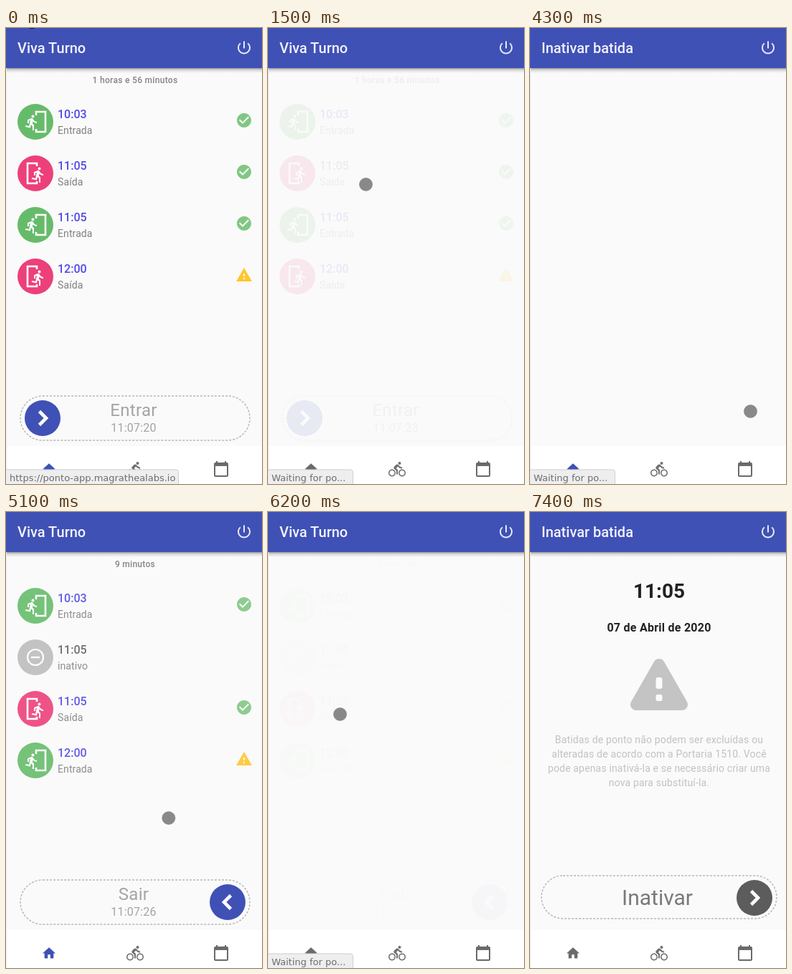
Animation, 357 px wide and 637 px high, one loop 8 s. Source, as an HTML page:

```html
<!DOCTYPE html>
<html lang="pt-BR">
<head>
<meta charset="utf-8">
<title>Viva Turno</title>
<style>
  html, body { margin: 0; width: 100%; height: 100%; overflow: hidden; background: #fafafa; }
  svg { display: block; width: 100vw; height: 100vh; font-family: Roboto, sans-serif; filter: blur(.45px); }
  .mid { text-anchor: middle; }
  .time { font-size: 16px; font-weight: 500; fill: #5149ea; }
  .kind { font-size: 14px; fill: #808080; letter-spacing: .1px; }
  .total { font-size: 12px; font-weight: 500; fill: #858585; letter-spacing: .3px; }
  .action { font-size: 24px; fill: #a4a4a4; letter-spacing: .3px; }
  .clock { font-size: 16px; fill: #a4a4a4; letter-spacing: .25px; }
  .note { font-size: 14px; fill: #c2c2c2; letter-spacing: .16px; }
  .track { fill: none; stroke: #b8b8b8; stroke-width: 1.5; stroke-dasharray: 3 2; }
  .line { fill: none; stroke: #fff; }
</style>
</head>
<body>
<svg id="stage" viewBox="0 0 357 637">
  <defs>
    <linearGradient id="shade" x2="0" y2="1">
      <stop offset="0" stop-color="#000" stop-opacity=".38"/>
      <stop offset=".4" stop-color="#000" stop-opacity=".13"/>
      <stop offset="1" stop-color="#000" stop-opacity="0"/>
    </linearGradient>
  </defs>
  <rect width="357" height="637" fill="#fafafa"/>
  <g id="before"></g>
  <g id="after"></g>
  <g id="detail"></g>
  <rect y="56" width="357" height="7" fill="url(#shade)"/>
  <rect width="357" height="56" fill="#3f51b5"/>
  <text id="title" x="16" y="35" font-size="20" font-weight="500" fill="#f2f3fb"></text>
  <g id="power"></g>
  <rect y="584" width="357" height="53" fill="#fff"/>
  <g id="nav"></g>
  <rect y="56" width="1" height="581" fill="#ececec"/>
  <g id="status">
    <path id="tag" fill="#eee" stroke="#cfcfcf"/>
    <text id="tagText" x="5" y="632.5" font-size="13" fill="#6c6c6c" font-family="DejaVu Sans, sans-serif"></text>
  </g>
  <circle id="touch" r="9.3"/>
</svg>
<script>
const LOOP = 8000, STEP = 100;
const $ = id => document.getElementById(id);

const ICON = {
  home: 'M10 20v-6h4v6h5v-8h3L12 3 2 12h3v8z',
  bike: 'M15.5 5.5c1.1 0 2-.9 2-2s-.9-2-2-2-2 .9-2 2 .9 2 2 2zM5 12c-2.8 0-5 2.2-5 5s2.2 5 5 5 5-2.2 5-5-2.2-5-5-5zm0 8.5c-1.9 0-3.5-1.6-3.5-3.5s1.6-3.5 3.5-3.5 3.5 1.6 3.5 3.5-1.6 3.5-3.5 3.5zm5.8-10l2.4-2.4.8.8c1.3 1.3 3 2.1 5.1 2.1V9c-1.5 0-2.7-.6-3.6-1.5l-1.9-1.9c-.5-.4-1-.6-1.6-.6s-1.1.2-1.4.6L7.8 8.4c-.4.4-.6.9-.6 1.4 0 .6.2 1.1.6 1.4L11 14v5h2v-6.2l-2.2-2.3zM19 12c-2.8 0-5 2.2-5 5s2.2 5 5 5 5-2.2 5-5-2.2-5-5-5zm0 8.5c-1.9 0-3.5-1.6-3.5-3.5s1.6-3.5 3.5-3.5 3.5 1.6 3.5 3.5-1.6 3.5-3.5 3.5z',
  calendar: 'M20 3h-1V1h-2v2H7V1H5v2H4c-1.1 0-2 .9-2 2v16c0 1.1.9 2 2 2h16c1.1 0 2-.9 2-2V5c0-1.1-.9-2-2-2zm0 18H4V8h16v13z',
  power: 'M13 3h-2v10h2V3zm4.83 2.17l-1.42 1.42C17.99 7.86 19 9.81 19 12c0 3.87-3.13 7-7 7s-7-3.13-7-7c0-2.19 1.01-4.14 2.58-5.42L6.17 5.17C4.23 6.82 3 9.26 3 12c0 4.97 4.03 9 9 9s9-4.03 9-9c0-2.74-1.23-5.18-3.17-6.83z',
  check: 'M12 2C6.48 2 2 6.48 2 12s4.48 10 10 10 10-4.48 10-10S17.52 2 12 2zm-2 15l-5-5 1.41-1.41L10 14.17l7.59-7.59L19 8l-9 9z',
  warn: 'M1 21h22L12 2 1 21zm12-3h-2v-2h2v2zm0-4h-2v-4h2v4z',
  run: 'M13.49 5.48c1.1 0 2-.9 2-2s-.9-2-2-2-2 .9-2 2 .9 2 2 2zm-3.6 13.9l1-4.4 2.1 2v6h2v-7.5l-2.1-2 .6-3c1.3 1.5 3.3 2.5 5.5 2.5v-2c-1.9 0-3.5-1-4.3-2.4l-1-1.6c-.4-.6-1-1-1.7-1-.3 0-.5.1-.8.1l-5.2 2.2v4.7h2v-3.4l1.8-.7-1.6 8.1-4.9-1-.4 2 7 1.4z'
};

const icon = (name, x, y, fill, extra = '', scale = 1) =>
  `<path d="${ICON[name]}" transform="translate(${x} ${y}) scale(${scale})" fill="${fill}" ${extra}/>`;
const text = (cls, x, y, s, extra = '') => `<text class="${cls}" x="${x}" y="${y}" ${extra}>${s}</text>`;
const track = (x, y, w, h) =>
  `<rect class="track" x="${x}" y="${y}" width="${w}" height="${h}" rx="${h / 2}"/>`;
const knob = (x, y, dir, extra = '') =>
  `<g transform="translate(${x} ${y})" ${extra}><circle r="25" fill="#3f51b5"/>
   <path class="line" stroke-width="4.6" d="M${-4.5 * dir} -9.5L${5 * dir} 0L${-4.5 * dir} 9.5"/></g>`;

const BADGE = {
  Entrada: ['#66bb6a', '<path class="line" stroke-width="2.6" d="M1 -9V-14H14V14H1V10"/>' + icon('run', -17, -11, '#fff')],
  'Saída': ['#ec407a', '<path class="line" stroke-width="2.6" d="M2 -10V-14H-11V14H2V11"/>' + icon('run', -8, -10, '#fff')],
  inativo: ['#bdbdbd', '<circle class="line" r="11" stroke-width="2.2"/><path class="line" stroke-width="2.4" d="M-6 0H6"/>']
};

function row(i, time, kind, mark) {
  const y = 131 + 72 * i, [color, art] = BADGE[kind];
  const marks = {
    check: icon('check', 320, y - 14, '#81c784'),
    warn: icon('warn', 320, y - 14, '#ffc62e')
  };
  return `<g transform="translate(41 ${y})"><circle r="25" fill="${color}"/>${art}</g>` +
    text('time', 72, y - 5, time, kind === 'inativo' ? 'style="fill:#606060"' : '') +
    text('kind', 72, y + 17, kind) + (marks[mark] || '');
}

function home(total, rows, action, knobX, dir) {
  return text('total mid', 180, 77, total) +
    `<g class="rows">${rows.map((r, i) => row(i, ...r)).join('')}</g>` +
    track(20, 514, 320, 62) +
    text('action mid', 178, 542, action) + text('clock mid', 178, 564, '') +
    knob(knobX, 545, dir);
}

$('before').innerHTML = home('1 horas e 56 minutos', [
  ['10:03', 'Entrada', 'check'], ['11:05', 'Saída', 'check'],
  ['11:05', 'Entrada', 'check'], ['12:00', 'Saída', 'warn']], 'Entrar', 51, 1);
$('after').innerHTML = home('9 minutos', [
  ['10:03', 'Entrada', 'check'], ['11:05', 'inativo'],
  ['11:05', 'Saída', 'check'], ['12:00', 'Entrada', 'warn']], 'Sair', 309, -1);

$('detail').innerHTML =
  text('mid', 180, 120, '11:05', 'font-size="28" font-weight="700" fill="#222"') +
  text('mid', 180, 167, '07 de Abril de 2020', 'font-size="16" font-weight="700" fill="#222" letter-spacing=".25"') +
  `<path d="M180 213L148 269H212Z" fill="#c4c4c4" stroke="#c4c4c4" stroke-width="16" stroke-linejoin="round"/>
   <rect x="175.5" y="231" width="9" height="16" rx="3" fill="#fafafa"/>
   <rect x="175.5" y="255" width="9" height="9" rx="2" fill="#fafafa"/>` +
  ['Batidas de ponto não podem ser excluídas ou', 'alteradas de acordo com a Portaria 1510. Você',
   'pode apenas inativá-la e se necessário criar uma', 'nova para substituí-la.']
    .map((s, i) => text('note mid', 180, 323 + 20 * i, s)).join('') +
  track(16, 508, 328, 60) +
  text('mid', 177.5, 549, 'Inativar', 'font-size="30" fill="#7a7a7a"') +
  knob(47, 539, 1, 'id="slider"');

$('power').innerHTML = icon('power', 320, 15.5, '#e8eaf7');
$('nav').innerHTML = icon('home', 49.2, 605.6, '', 'id="homeIcon"', .9) +
  icon('bike', 168, 604.5, '#707070') + icon('calendar', 288, 604, '#6a6a6a');

// Linear interpolation over [time, ...values] keys.
function mix(keys, t) {
  let a = keys[0];
  for (const b of keys) {
    if (b[0] > t) {
      const k = t <= a[0] ? 0 : (t - a[0]) / (b[0] - a[0]);
      return a.slice(1).map((v, i) => v + (b[i + 1] - v) * k);
    }
    a = b;
  }
  return a.slice(1);
}

const fadeOut = t => [[t, 1], [t + 100, .75], [t + 200, .35], [t + 300, .1], [t + 400, .02], [t + 500, 0]];
const fade = {
  before: [[0, 1], ...fadeOut(1200)],
  after: [[0, 0], [4799, 0], [4800, 1], ...fadeOut(5800)],
  detail: [[0, 0], [2100, 0], [2400, 1], [4299, 1], [4300, 0], [6600, 0], [6900, 1]]
};
const slide = [[0, 47], [3000, 47], [3400, 313], [4300, 313], [4301, 47], [7000, 47], [7400, 313]];
const path = [[0, 36, -8.5], [700, 136.5, 218.5], [1900, 136.5, 218.5], [2400, 92, 388], [2900, 92, 388],
  [3000, 48, 540], [3400, 307.5, 535.5], [4400, 307.5, 535.5], [4500, 290, 500], [4900, 290, 500],
  [5500, 100.5, 282.5], [6600, 100.5, 282.5], [7000, 48, 540], [7400, 307.5, 535.5]];

const within = (t, ...spans) => spans.some(([a, b]) => t >= a && t < b);
const set = (el, attrs) => { for (const k in attrs) el.setAttribute(k, attrs[k]); };

function setStatus(t) {
  const link = t < 1400, wait = within(t, [1400, 2000], [4300, 4800], [6000, 6600]);
  set($('status'), { visibility: link || wait ? 'visible' : 'hidden' });
  const right = link ? 241 : 119;
  set($('tag'), { d: `M-2 617H${right - 4}q3.5 0 3.5 3.5V640H-2Z` });
  $('tagText').textContent = link ? 'https://ponto-app.magrathealabs.io' : 'Waiting for po...';
}

function draw(t) {
  for (const id in fade) {
    const [o] = mix(fade[id], t);
    set($(id), { opacity: o, visibility: o ? 'visible' : 'hidden' });
  }
  $('before').querySelectorAll('.time')[1].style.fill = t >= 1300 ? '#777' : '';
  set($('after').querySelector('.rows'), { opacity: mix([[4800, .6], [5200, 1]], t)[0] });

  const sec = t < 300 ? 20 : t < 700 ? 21 : t < 1300 ? 22 : t < 4000 ? 23 : t < 5000 ? 25 : t < 5400 ? 26 : 27;
  document.querySelectorAll('.clock').forEach(c => c.textContent = '11:07:' + sec);

  const [x] = mix(slide, t), done = x >= 313;
  set($('slider'), { transform: `translate(${x} 539)` });
  set($('slider').firstElementChild, { fill: done ? '#5c5c5c' : '#3f51b5' });

  $('title').textContent = within(t, [1800, 4500], [6500, LOOP]) ? 'Inativar batida' : 'Viva Turno';
  set($('homeIcon'), { fill: within(t, [0, 1400], [4300, 6000]) ? '#3f51b5' : '#6a6a6a' });
  setStatus(t);

  const [cx, cy] = mix(path, t);
  const pressed = within(t, [0, 100], [900, 1300], [3000, 3400], [5800, 6000], [7000, 7400]);
  set($('touch'), {
    cx, cy,
    visibility: within(t, [3400, 4300], [7400, LOOP]) ? 'hidden' : 'visible',
    fill: `rgba(0,0,0,${pressed ? .52 : .45})`,
    stroke: pressed ? 'rgba(0,0,0,.55)' : 'rgba(0,0,0,.08)'
  });
}

const start = performance.now();
function tick() {
  const t = (performance.now() - start) % LOOP;
  draw(Math.floor(t / STEP) * STEP);
  requestAnimationFrame(tick);
}
tick();
</script>
</body>
</html>
```
